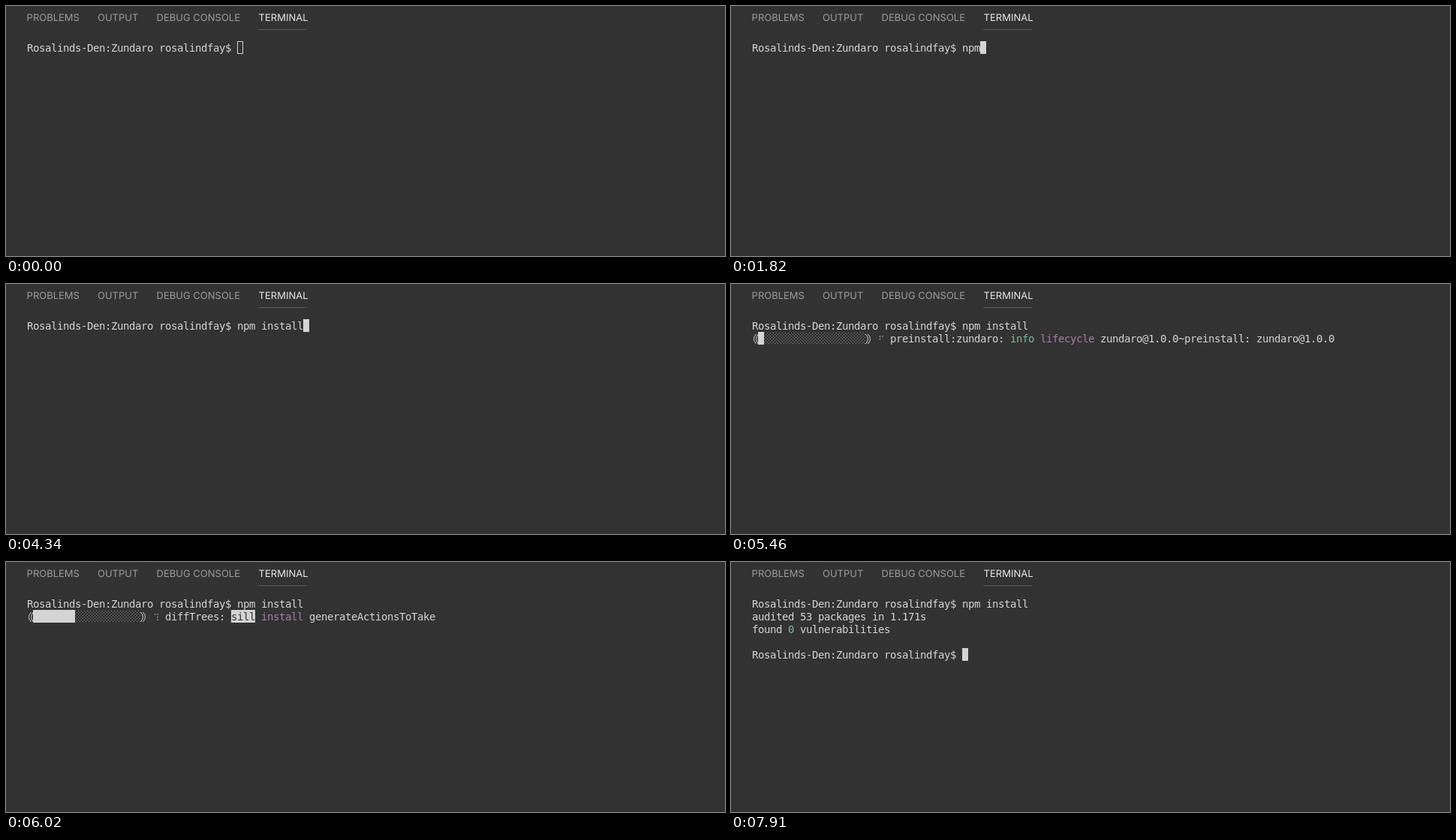
Recreate the animation shown at these times as an HTML page. Size 958 by 334 pixels, loop 8190 ms.

```html
<!DOCTYPE html>
<html lang="en">
<head>
<meta charset="utf-8">
<title>Terminal</title>
<style>
  html, body { margin: 0; width: 100%; height: 100%; overflow: hidden; background: #323232; }
  svg { display: block; }
  .tabs { font: 13px Inter, Roboto, sans-serif; fill: #9c9c9c; text-rendering: geometricPrecision; }
  .tabs .active { fill: #e9e9e9; }
  #screen { font: 14px "DejaVu Sans Mono", "Liberation Mono", monospace; white-space: pre; }
</style>
</head>
<body>
<svg width="958" height="334" viewBox="0 0 958 334">
  <defs>
    <pattern id="shade" width="4" height="4" patternUnits="userSpaceOnUse">
      <path d="M0 1h1v1h-1zM2 3h1v1h-1z" fill="#868686"/>
    </pattern>
  </defs>
  <rect width="958" height="334" fill="#323232"/>
  <g class="tabs">
    <text x="27.6" y="20">PROBLEMS</text>
    <text x="122" y="20">OUTPUT</text>
    <text x="200.6" y="20">DEBUG CONSOLE</text>
    <text x="336.6" y="20" class="active">TERMINAL</text>
    <rect x="336" y="31" width="65" height="1" fill="#5a5a5a"/>
  </g>
  <g id="screen"></g>
</svg>
<script>
const LOOP = 8190, CELL_W = 8, CELL_H = 17, LEFT = 28, TOP = 47, BAR_CELLS = 18;
const FG = '#d4d4d4', BG = '#323232', GREEN = '#7fb69c', PURPLE = '#a77ca9';
const PROJECT = 'Zundaro', PACKAGE = 'zundaro@1.0.0';
const PROMPT = `Rosalinds-Den:${PROJECT} rosalindfay$ `;
const COMMAND = 'npm install';
const KEY_TIMES = [1400, 1540, 1680, 2660, 2730, 2870, 3080, 3290, 3430, 3570, 3710];
const FOCUS = 350, ENTER = 4410, START = 5460, REPORT = 6650, DONE = 6720;
const SPINNER = [[1, 2, 4], [1, 4, 5], [1, 4, 5, 6], [4, 5, 6], [3, 4, 5, 6],
                 [3, 5, 6], [2, 3, 6], [1, 2, 3, 6], [1, 2, 3], [1, 2, 3, 4]];

const lifecycle = stage => [
  [`${stage}:${PROJECT.toLowerCase()}:`], ['info', GREEN], ['lifecycle', PURPLE],
  [`${PACKAGE}~${stage}: ${PACKAGE}`]
];
const silly = (stage, step) => [[stage + ':'], ['sill', BG, FG], ['install', PURPLE], [step]];

const STAGES = [
  { at: START, filled: 1, spin: 0, words: lifecycle('preinstall') },
  { at: 5740, filled: 4, spin: 1, words: silly('loadIdealTree', 'loadIdealTree') },
  { at: 5950, filled: 7, spin: 2, words: silly('diffTrees', 'generateActionsToTake') },
  { at: 6510, filled: 9, spin: 5, words: lifecycle('prepare') }
];

const colX = col => LEFT + col * CELL_W;
const rowY = row => TOP + row * CELL_H;

function block(row, col, cells, fill = FG) {
  return `<rect x="${colX(col)}" y="${rowY(row)}" width="${cells * CELL_W}" height="${CELL_H}" fill="${fill}"/>`;
}

// Every glyph sits on the terminal's cell grid.
function print(row, col, string, fill = FG) {
  const xs = [...string].map((_, i) => colX(col + i)).join(' ');
  return `<text x="${xs}" y="${rowY(row) + 14}" fill="${fill}">${string}</text>`;
}

function printWords(row, col, words) {
  return words.map(([string, fill, back]) => {
    const out = (back ? block(row, col, string.length, back) : '') + print(row, col, string, fill);
    col += string.length + 1;
    return out;
  }).join('');
}

function cursor(row, col, focused = true) {
  if (focused) return block(row, col, 1);
  return `<rect x="${colX(col) + .5}" y="${rowY(row) + .5}" width="7" height="16" fill="none" stroke="${FG}"/>`;
}

function spinner(row, col, dots) {
  return dots.map(dot => {
    const x = colX(col) + 2.5 + (dot > 3 ? 3.5 : 0);
    const y = rowY(row) + 6 + (dot - 1) % 3 * 3.5;
    return `<circle cx="${x}" cy="${y}" r=".75" fill="${FG}"/>`;
  }).join('');
}

function progress(row, { filled, spin, words }) {
  const y = rowY(row) + 3;
  const bracket = `<path d="M33.5 ${y}q-6 6.5 0 13M36.5 ${y}q-6 6.5 0 13" fill="none" stroke="${FG}"/>`;
  const mirror = 2 * colX(1) + BAR_CELLS * CELL_W;
  return bracket + `<g transform="translate(${mirror}) scale(-1 1)">${bracket}</g>`
    + block(row, 1 + filled, BAR_CELLS - filled, 'url(#shade)') + block(row, 1, filled)
    + spinner(row, 21, SPINNER[spin]) + printWords(row, 23, words);
}

function render(t) {
  const typed = KEY_TIMES.filter(time => time <= t).length;
  let out = print(0, 0, PROMPT + COMMAND.slice(0, typed));
  if (t < ENTER) return out + cursor(0, PROMPT.length + typed, t >= FOCUS);
  if (t < START) return out + cursor(1, 0);
  if (t < REPORT) return out + progress(1, STAGES.filter(stage => stage.at <= t).pop());
  out += print(1, 0, 'audited 53 packages in 1.171s')
    + printWords(2, 0, [['found'], ['0', GREEN], ['vulnerabilities']]);
  return t < DONE ? out + cursor(4, 0) : out + print(4, 0, PROMPT) + cursor(4, PROMPT.length);
}

const screen = document.getElementById('screen');
const began = performance.now();
let shown = '';

function frame() {
  const next = render((performance.now() - began) % LOOP);
  if (next !== shown) screen.innerHTML = shown = next;
  requestAnimationFrame(frame);
}
frame();
</script>
</body>
</html>
```
